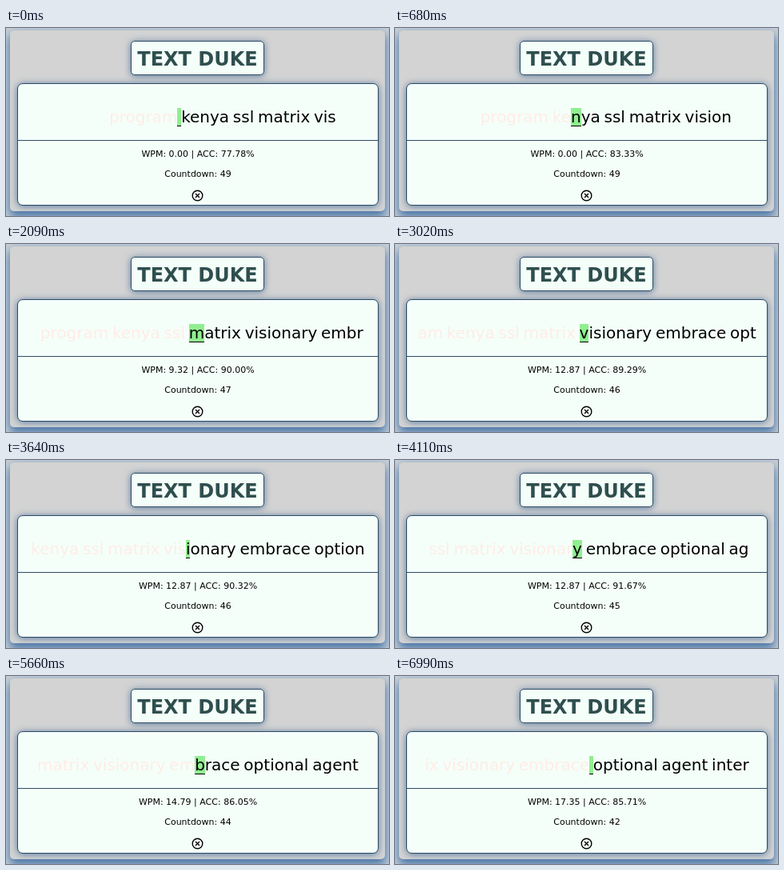
An HTML page that plays this animation: 479 by 235 pixels, repeating every 7300 ms.

```html
<!DOCTYPE html>
<html lang="en">
<head>
<meta charset="utf-8">
<title>Typing game</title>
<style>
  :root { --edge: #2b4c66; --paper: #f5fffa; }
  html, body { margin: 0; width: 100%; height: 100%; overflow: hidden; background: #c6ced6; }
  body { position: relative; font-family: "DejaVu Sans", Verdana, sans-serif; color: #000; }
  div, svg { position: absolute; box-sizing: border-box; }
  .card {
    left: 5px; top: 3px; width: 469px; height: 226px; border-radius: 5px;
    background: #d3d3d3; box-shadow: 0 6px 12px 1px #4a76a8;
  }
  .title, .panel {
    background: var(--paper); border: 1px solid var(--edge);
    box-shadow: 0 1px 8px #55779c;
  }
  .title {
    left: 156px; top: 16px; width: 167px; height: 43px; border-radius: 5px;
    font-size: 24px; font-weight: bold; line-height: 44px; color: #2f4f4f;
    text-align: center; white-space: nowrap;
  }
  .panel { left: 14px; top: 69px; width: 452px; height: 153px; border-radius: 7px; }
  .rule { left: 15px; top: 140px; width: 450px; height: 1px; background: var(--edge); }
  .line { left: 15px; width: 450px; text-align: center; white-space: pre; }
  .words { top: 100px; height: 23px; font-size: 20px; line-height: 23px; word-spacing: -1.6px; }
  .small { height: 14px; font-size: 11px; line-height: 14px; }
  #stats { top: 151px; }
  #clock { top: 176px; }
  #done { color: #ffece5; }
  #caret {
    display: inline-block; height: 23px; vertical-align: top;
    background: #90ee90; box-shadow: inset 0 -1px #000;
  }
  .close { left: 232px; top: 202px; fill: none; stroke: #000; stroke-width: 1.4; }
</style>
</head>
<body>
<div class="card"></div>
<div class="title">TEXT DUKE</div>
<div class="panel"></div>
<div class="rule"></div>
<div class="line words"><span id="done"></span><span id="caret"></span><span id="next"></span></div>
<div class="line small" id="stats"></div>
<div class="line small" id="clock"></div>
<svg class="close" width="15" height="15" viewBox="0 0 15 15">
  <circle cx="7.5" cy="7.5" r="6.3"/>
  <path d="M5 5l5 5M10 5l-5 5"/>
</svg>
<script>
  const LOOP = 7300, REACH = 20;
  // Hard spaces keep their word spacing at the start of a span
  const SPACE = "\u00a0";
  const TEXT = "program kenya ssl matrix visionary embrace optional agent inter"
    .replaceAll(" ", SPACE);

  // Evenly spaced bursts of keys: + correct, x wrong, . pause
  const bursts = [
    [370, 1230, "+ + + + + + +"],
    [1470, 2090, "+ + + . +"],
    [2330, 2330, "+"],
    [2560, 3020, "++ x+ + + +"],
    [3410, 4110, "+ + + + + + + +"],
    [4270, 4350, "+ +"],
    [4660, 4660, "x"],
    [4970, 5660, ". x + x +"],
    [5820, 5980, "+ + +"],
    [6140, 6210, "+ x+"]
  ];
  const keys = bursts.flatMap(([from, to, run]) => {
    const steps = run.split(" ");
    const gap = (to - from) / Math.max(1, steps.length - 1);
    return steps.map((hit, i) => ({ at: Math.round(from + gap * i), hit }));
  });
  const ticks = [943, 1935, 2905, 3930, 4970, 5980, 6990];
  // Speed is refreshed when a word's last letter is typed
  const speeds = [[7, 0], [13, 4.95], [17, 9.32], [24, 12.87], [34, 14.79], [42, 17.35]];

  const el = id => document.getElementById(id);
  const put = (id, text) => {
    if (el(id).textContent !== text) el(id).textContent = text;
  };
  const count = (text, mark) => text.split(mark).length - 1;

  function draw(t) {
    const typed = keys.filter(k => k.at <= t).map(k => k.hit).join("");
    const pos = 7 + count(typed, "+");
    const errors = 2 + count(typed, "x");
    const wpm = speeds.filter(([p]) => p <= pos).pop()[1];
    const acc = 100 * pos / (pos + errors);

    put("done", TEXT.slice(Math.max(0, pos - REACH), pos).padStart(REACH, SPACE));
    put("caret", TEXT[pos]);
    put("next", TEXT.slice(pos + 1, pos + 1 + REACH));
    put("stats", `WPM: ${wpm.toFixed(2)} | ACC: ${acc.toFixed(2)}%`);
    put("clock", `Countdown: ${49 - ticks.filter(at => at <= t).length}`);
  }

  function frame(now) {
    draw(now % LOOP);
    requestAnimationFrame(frame);
  }
  draw(0);
  requestAnimationFrame(frame);
</script>
</body>
</html>
```
